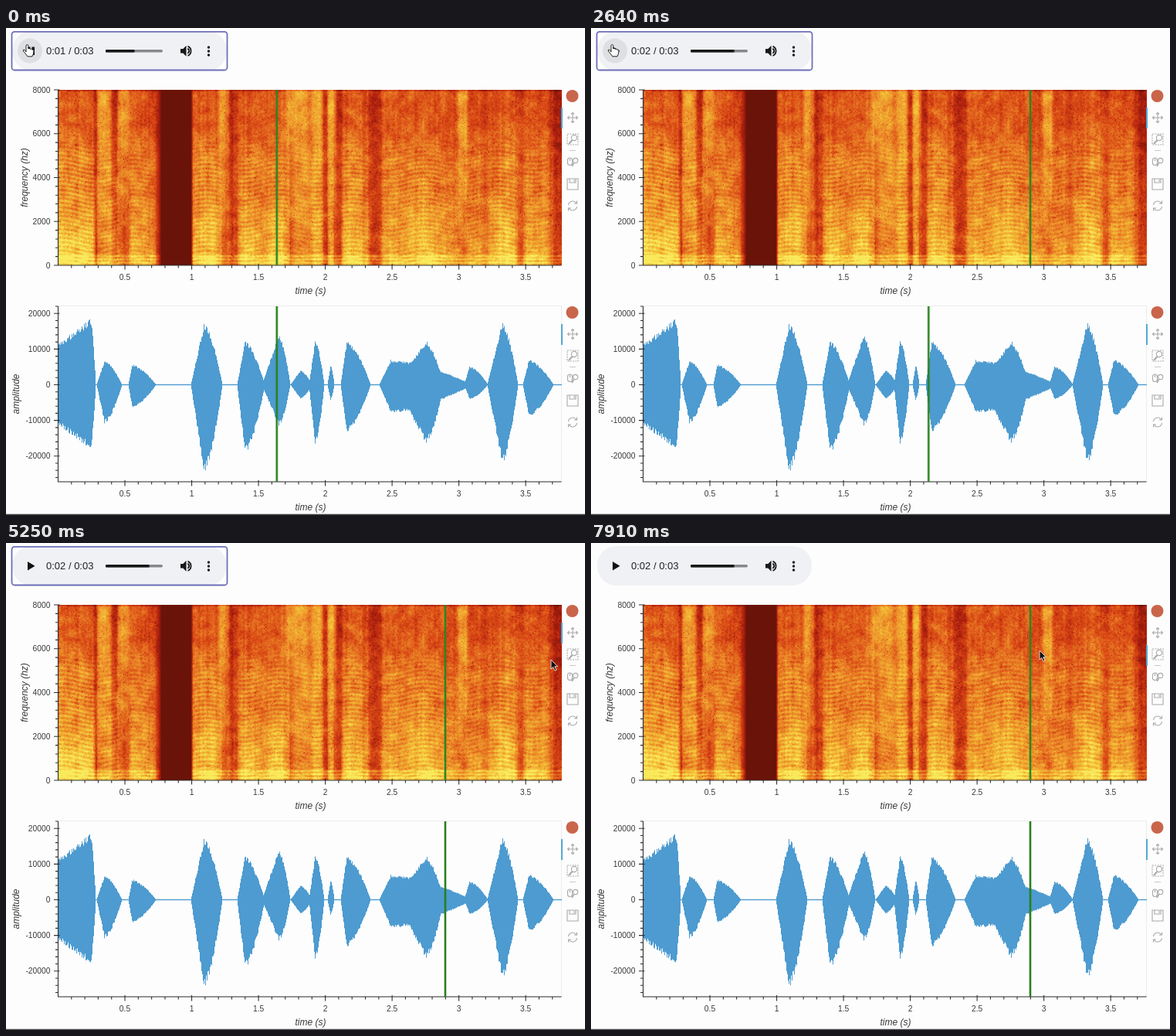
Recreate the animation shown at these times as an HTML page with a canvas. Size 750 by 630 pixels, loop 8000 ms.

```html
<!DOCTYPE html>
<html lang="en">
<head>
<meta charset="utf-8">
<title>Audio viewer</title>
<style>
html, body { margin: 0; width: 100%; height: 100%; overflow: hidden; background: #fdfdfd; }
canvas, svg { position: absolute; left: 0; top: 0; width: 750px; height: 630px; }
text { font: 10.3px "Liberation Sans", Arial, sans-serif; fill: #3a3a3a; }
.label { font-size: 12px; font-style: italic; text-anchor: middle; }
.clock { font-size: 13px; fill: #222; }
.icon { fill: none; stroke: #a9a9ab; stroke-width: 1.1; }
.anim { animation: 8s infinite step-end; }
#specLine { animation-name: specLine; }
#ampLine { animation-name: ampLine; }
#early { animation-name: early; }
#late { animation-name: late; }
#pause { animation-name: pause; }
#play { animation-name: play; }
#hover { animation-name: hover; }
#focus { animation-name: focus; }
#tool { animation-name: tool; }
#hand { animation-name: hand; }
#arrow { animation: arrow 8s infinite linear; }
#progress { transform-origin: 129px 0; animation: progress 8s infinite linear; }
@keyframes specLine { 0% { transform: translateX(350.8px); } 6% { transform: translateX(437.3px); } 28%, 100% { transform: translateX(569px); } }
@keyframes ampLine { 0% { transform: translateX(350.8px); } 17% { transform: translateX(437.3px); } 40%, 100% { transform: translateX(569px); } }
@keyframes early { 0% { opacity: 1; } 2.5%, 100% { opacity: 0; } }
@keyframes late { 0% { opacity: 0; } 2.5%, 100% { opacity: 1; } }
@keyframes pause { 0% { opacity: 1; } 24%, 100% { opacity: 0; } }
@keyframes play { 0% { opacity: 0; } 24%, 100% { opacity: 1; } }
@keyframes hover { 0% { opacity: 1; } 55%, 100% { opacity: 0; } }
@keyframes focus { 0% { opacity: 1; } 77%, 100% { opacity: 0; } }
@keyframes tool { 0% { transform: none; } 77%, 100% { transform: translateY(28.5px); } }
@keyframes hand { 0% { opacity: 1; } 50.5%, 100% { opacity: 0; } }
@keyframes progress { 0% { transform: scaleX(.51); } 8.5% { transform: scaleX(.57); } 24%, 100% { transform: scaleX(.77); } }
@keyframes arrow {
  0%, 50.4% { transform: translate(28px, 24px); opacity: 0; }
  50.5% { transform: translate(30px, 25px); opacity: 1; animation-timing-function: ease-in; }
  54% { transform: translate(197px, 65px); animation-timing-function: ease-out; }
  64%, 66% { transform: translate(706px, 151px); animation-timing-function: ease-in-out; }
  71%, 91.5% { transform: translate(729px, 143px); animation-timing-function: ease-in-out; }
  98.8%, 100% { transform: translate(581px, 139px); opacity: 1; }
}
</style>
</head>
<body>
<canvas id="plots" width="750" height="630"></canvas>
<svg viewBox="0 0 750 630">
  <g id="player">
    <rect x="8" y="4" width="278" height="51" rx="25" fill="#eff1f5"/>
    <rect id="focus" class="anim" x="7.5" y="4.8" width="279" height="49.7" rx="3.5" fill="none" stroke="#6d6fb8" stroke-width="1.8"/>
    <circle id="hover" class="anim" cx="31" cy="29.5" r="16" fill="#333" fill-opacity=".09"/>
    <path id="play" class="anim" d="M28 24L37.5 29.7L28 35.4Z" fill="#111"/>
    <path id="pause" class="anim" d="M28 24.5h3.5v10.5h-3.5zM33.5 24.5h3.5v10.5h-3.5z" fill="#111"/>
    <text id="early" class="anim clock" x="52" y="34">0:01 / 0:03</text>
    <text id="late" class="anim clock" x="52" y="34">0:02 / 0:03</text>
    <rect x="129" y="28" width="74" height="3.4" rx="1.7" fill="#86888c"/>
    <rect id="progress" x="129" y="28" width="74" height="3.4" rx="1.5" fill="#161616"/>
    <path d="M226 27h3.3l4.2-4.3v14l-4.2-4.3h-3.3z" fill="#181818"/>
    <path d="M235.3 26.6a3.5 3.5 0 0 1 0 6.2M235.5 23.6a6.6 6.6 0 0 1 0 12.2" fill="none" stroke="#181818" stroke-width="1.8"/>
    <g fill="#181818"><circle cx="262.5" cy="25" r="1.7"/><circle cx="262.5" cy="30" r="1.7"/><circle cx="262.5" cy="35" r="1.7"/></g>
  </g>
  <g id="axes"></g>
  <g id="tools"></g>
  <path d="M0 629.4H750" stroke="#444" stroke-width="1.2"/>
  <rect id="tool" class="anim" x="719" y="103" width="2" height="27" fill="#55a8d4"/>
  <rect x="719" y="383" width="2" height="27" fill="#55a8d4"/>
  <path id="specLine" class="anim" d="M0 80V307" stroke="#2c8520" stroke-width="2.6"/>
  <path id="ampLine" class="anim" d="M0 360V587" stroke="#28801c" stroke-width="2.6"/>
  <path id="hand" class="anim" d="M26 31V23.2q0-1.7 1.4-1.7t1.4 1.7v3.6q1.8-.8 2.5.5 1.7-.6 2.3.7 2.4-.5 2.4 1.6 0 4-2 7.2h-6.1q-2.8-3.9-5.2-6.7-1.1-1.8.2-2.1 1.4-.4 3.1 3z" fill="#fff" stroke="#222"/>
  <path id="arrow" d="M0 0V12L2.7 9.5L5 14.2L7 13.2L4.8 8.7H8.5Z" fill="#111" stroke="#fff" stroke-width=".8"/>
</svg>
<script>
const LEFT = 67.5, RIGHT = 719.5, SECOND = 173.05, ZERO = 461.5;
const ctx = document.getElementById('plots').getContext('2d');
const axes = document.getElementById('axes');
const tools = document.getElementById('tools');
const add = (parent, markup) => parent.insertAdjacentHTML('beforeend', markup);
const mix = (a, b, k) => a + (b - a) * k;
const clamp = v => Math.max(0, Math.min(1, v));
const ramp = (a, b, x) => clamp((x - a) / (b - a));
const plateau = (x, centre, width) => Math.exp(-(((x - centre) / width) ** 4));

function hash(x, y) {
  let h = Math.imul(x, 374761393) + Math.imul(y, 668265263);
  h = Math.imul(h ^ (h >>> 13), 1274126177);
  return ((h ^ (h >>> 16)) >>> 0) / 4294967296;
}

function smoothNoise(x, y) {
  const i = Math.floor(x), j = Math.floor(y), u = x - i, v = y - j;
  return mix(mix(hash(i, j), hash(i + 1, j), u), mix(hash(i, j + 1), hash(i + 1, j + 1), u), v) - .5;
}

// Each syllable: start, peak, end, height above and below the zero line.
const syllables = [
  [0, 109, 116, 82, 80], [117, 127, 150, 30, 48], [158, 163, 194, 25, 28],
  [239, 256, 280, 76, 108], [299, 309, 335, 54, 84], [331, 353, 368, 62, 51],
  [368, 381, 396, 18, 18], [392, 400, 412, 55, 76], [416, 420, 425, 25, 19],
  [433, 441, 472, 54, 58], [483, 498, 604, 31, 35], [504, 543, 567, 54, 72],
  [593, 600, 624, 23, 18], [623, 642, 663, 77, 98], [669, 677, 709, 31, 39]
];

function loudness(x, side) {
  return Math.max(0, ...syllables.map(s => {
    const [start, peak, end] = s;
    const shape = x < peak ? ramp(start, peak, x) : 1 - ramp(peak, end, x) ** 1.6;
    return s[side] * shape;
  }));
}

// Centre and half width of hissing sounds and of short breaks.
const hisses = [[126, 9], [152, 8], [281, 7], [377, 17], [402, 8], [421, 6], [591, 7]];
const breaks = [[115, 3], [140, 4], [294, 6], [413, 3], [431, 4], [478, 8]];
const sum = (list, x) => list.reduce((total, [c, w]) => total + plateau(x, c, w), 0);

const palette = ['#6a1309', '#ad1f0e', '#d94815', '#ea8527', '#f3bd36', '#f9ea5c']
  .map(c => [1, 3, 5].map(i => parseInt(c.slice(i, i + 2), 16)));

function heat(v) {
  const p = clamp(v) * 4.999, i = Math.floor(p);
  return palette[i].map((c, n) => mix(c, palette[i + 1][n], p - i));
}

function drawSpectrogram() {
  const w = 652, h = 227, image = ctx.createImageData(w, h);
  for (let i = 0; i < w; i++) {
    const x = i + 68;
    const voice = Math.sqrt(clamp(loudness(x, 3) / 55));
    const hiss = sum(hisses, x), gap = sum(breaks, x);
    const sounding = 1 - ramp(193, 201, x) * (1 - ramp(239, 242, x));
    const fade = .2 * ramp(700, 712, x) + .14 * gap;
    const high = .38 + .08 * voice + .27 * hiss - fade;
    const mid = .47 + .14 * voice + .1 * hiss - fade;
    const low = .48 + .36 * voice - .06 * hiss - fade;
    const streak = smoothNoise(x / 2.5, 3) * .1;
    for (let y = 0; y < h; y++) {
      const f = 1 - y / h;
      let v = mix(mix(low, mid, ramp(.12, .42, f)), high, ramp(.6, .82, f));
      const wave = Math.sin((h - y + 4 * Math.sin(x / 15)) * 2 * Math.PI / 5.6);
      v += .08 * voice * wave * ramp(.78, .58, f);
      v += streak + smoothNoise(x / 9, y / 9 + 50) * .2 + smoothNoise(x / 1.8, y / 1.8) * .18;
      if (f < .065) v += .15 + .08 * Math.sin(y * 1.5);
      if (y < 2) v -= .15;
      if (hash(x, y + 900) < .012) v -= .25;
      image.data.set([...heat(v * sounding), 255], (y * w + i) * 4);
    }
  }
  ctx.putImageData(image, 68, 80);
}

function drawWave() {
  ctx.fillStyle = '#4d9bd0';
  for (let x = 68; x < 720; x++) {
    const [up, down] = [3, 4].map(side => Math.max(.7, loudness(x, side) * (.93 + .12 * hash(x, side))));
    ctx.fillRect(x, ZERO - up, 1, up + down);
  }
}

function drawAxes(top, bottom, yAt, step, from, to, name, nameX) {
  let d = `M${LEFT} ${top}V${bottom}H${RIGHT}`;
  for (let n = 1; n <= 37; n++) {
    const x = LEFT + n * SECOND / 10, major = n % 5 === 0;
    d += `M${x} ${bottom - (major ? 2 : 0)}V${bottom + (major ? 5.5 : 3.5)}`;
    if (major) add(axes, `<text x="${x}" y="${bottom + 18.5}" text-anchor="middle">${n / 10}</text>`);
  }
  for (let v = from; v <= to; v += step / 5) {
    const major = v % step === 0, y = yAt(v);
    d += `M${LEFT + (major ? 2 : 0)} ${y}H${LEFT - (major ? 5.5 : 3.5)}`;
    if (major) add(axes, `<text x="57.5" y="${y + 3.6}" text-anchor="end">${v}</text>`);
  }
  add(axes, `<path d="${d}" stroke="#303030" stroke-width="1.1" fill="none"/>
    <text class="label" x="394.5" y="${bottom + 36.5}">time (s)</text>
    <text class="label" transform="translate(${nameX} ${(top + bottom) / 2}) rotate(-90)">${name}</text>`);
}

function drawTools(y) {
  add(tools, `<circle cx="733.5" cy="${y}" r="8" fill="#c9654b"/>
    <g class="icon" transform="translate(734 ${y})">
      <path d="M-6.5 28H6.5M0 21.5V34.5M-2 23.5L0 21.5L2 23.5M-2 32.5L0 34.5L2 32.5M-4.5 26L-6.5 28L-4.5 30M4.5 26L6.5 28L4.5 30"/>
      <rect x="-7" y="49" width="14" height="14" stroke-dasharray="2 1.3"/>
      <circle cx="2" cy="54" r="3.6"/><path d="M-.5 57L-5 62" stroke-width="2"/>
      <path d="M-4 70.5H4" opacity=".6"/>
      <rect x="-6.5" y="80" width="6" height="9.5" rx="3"/><path d="M-3.5 81V84"/>
      <circle cx="3.7" cy="83.5" r="3.1"/><path d="M2 86L-1 91" stroke-width="1.6"/>
      <path d="M-7 107H7V121H-7ZM-4 107V112H4V107M2 108V111"/>
      <path d="M-5.5 141a5.6 5.6 0 0 1 10.2-2.5M5.5 143a5.6 5.6 0 0 1-10.2 2.5M5.5 135.5V139H2M-5.5 148.5V145H-2"/>
    </g>`);
}

drawSpectrogram();
ctx.strokeStyle = '#ececec';
ctx.strokeRect(67.5, 359.5, 652, 227.5);
drawWave();
drawAxes(80, 307, v => 307 - v * 227 / 8000, 2000, 0, 8000, 'frequency (hz)', 28);
drawAxes(360, 587, v => ZERO - v * .004615, 10000, -26000, 22000, 'amplitude', 17);
drawTools(88);
drawTools(368);
</script>
</body>
</html>
```
